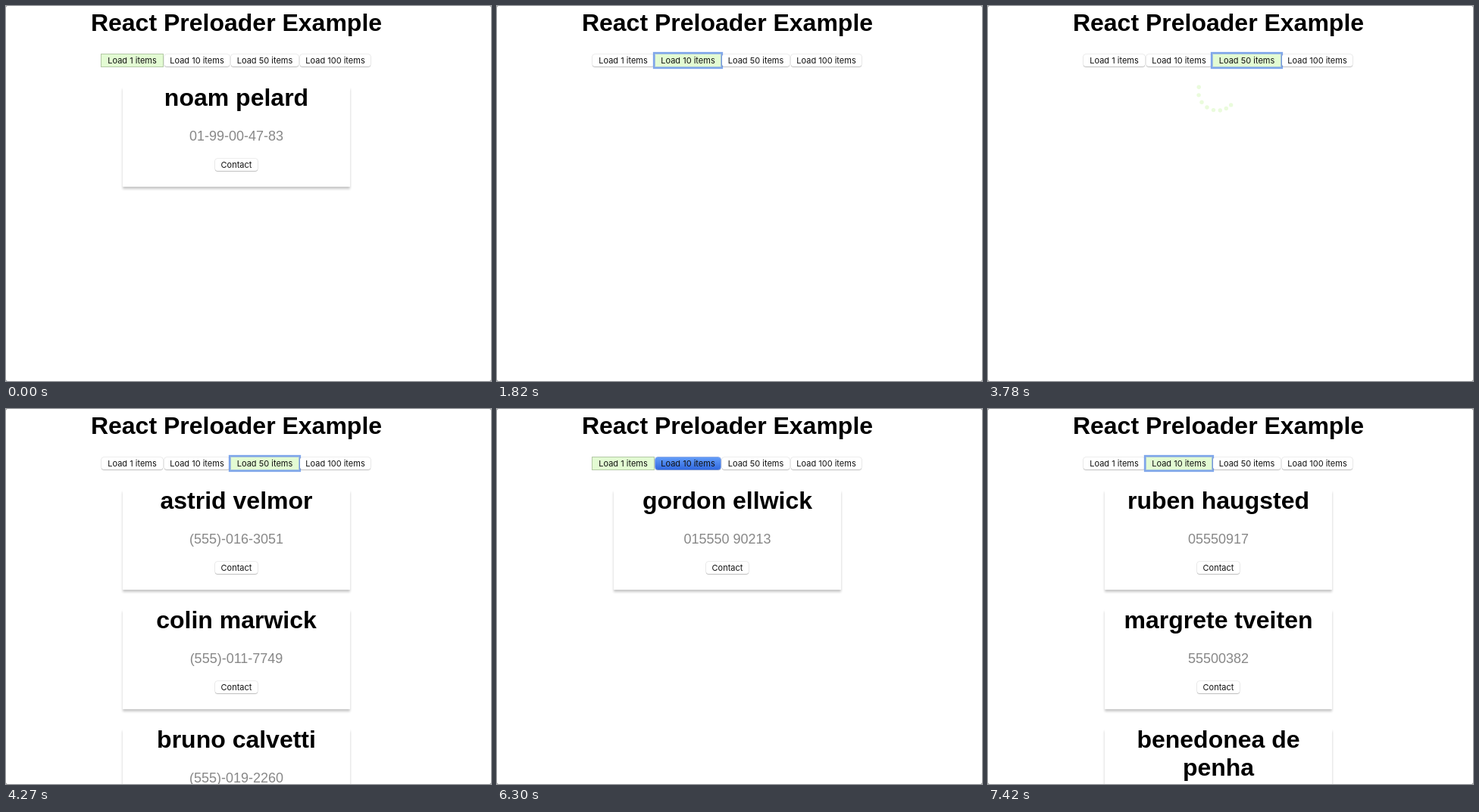
Write an HTML page that moves like this. It is 640 by 496 pixels and loops after 8000 ms.

```html
<!DOCTYPE html>
<html lang="en">
<head>
<meta charset="utf-8">
<title>React Preloader Example</title>
<style>
  html, body { margin: 0; width: 100%; height: 100%; overflow: hidden; background: #777; }
  #stage {
    position: relative; width: 640px; height: 496px; overflow: hidden;
    background: #fff; border-radius: 2px;
    font-family: "Liberation Sans", Arial, sans-serif; text-align: center;
  }
  #stage > *, .card > * { position: absolute; margin: 0; box-sizing: border-box; }
  h1, h2 { font-size: 32px; line-height: 37px; font-weight: bold; color: #000; }
  h1 { left: 0; top: 4px; width: 608px; }
  .btn {
    height: 16px; border-radius: 3px; background: #fff; color: #111;
    font: 11px/16px Inter, sans-serif; white-space: nowrap;
    box-shadow: 0 0 0 .5px rgba(0,0,0,.14), 0 1px 1px rgba(0,0,0,.2);
  }
  .btn.active {
    border-radius: 0; background: #e3fbd3;
    box-shadow: 0 0 0 1px #b4c9a6;
  }
  .btn.ring { box-shadow: 0 0 0 1px #a5c3dc, 0 0 1px 3px #7fa6ea; }
  .btn.pressed {
    background: linear-gradient(#639df8, #3169e0);
    box-shadow: 0 0 0 .5px #2b5fd0, 0 1px 1px rgba(0,0,0,.25);
  }
  .card {
    left: 154px; width: 300px; height: 132px; background: #fff;
    box-shadow: 0 3px 3px rgba(0,0,0,.22);
  }
  .card h2 { left: 0; top: -4px; width: 300px; white-space: pre; }
  .card p { left: 0; top: 55px; width: 300px; font-size: 18px; line-height: 20px; color: #888; }
  .card .btn { left: 122px; top: 95px; width: 56px; }
  .card.tall { height: 169px; }
  .card.tall p { top: 92px; }
  .card.tall .btn { top: 132px; }
  #spinner { left: 0; top: 0; }
</style>
</head>
<body>
<div id="stage"><h1>React Preloader Example</h1></div>
<script>
const LOOP = 8000, STEP = 70;
const stage = document.getElementById("stage");

const buttons = [
  ["Load 1 items", 126, 81], ["Load 10 items", 209, 86],
  ["Load 50 items", 297, 89], ["Load 100 items", 388, 93]
];

const lists = {
  single: [["noam pelard", "01-99-00-47-83"]],
  ten: [["meron kuang", "(555)-014-2387"], ["kristel harlow", "(555)-018-6402"],
        ["goran bonvel", "(555)-012-9716"]],
  fifty: [["astrid velmor", "(555)-016-3051"], ["colin marwick", "(555)-011-7749"],
          ["bruno calvetti", "(555)-019-2260"]],
  singleAgain: [["gordon ellwick", "015550 90213"]],
  tenAgain: [["ruben haugsted", "05550917"], ["margrete tveiten", "55500382"],
             ["benedonea de\npenha", "(55) 5550-0174"]]
};

// time, active button, focus ring, pressed button, content
const states = [
  [0, 0, false, -1, "single"],
  [1400, 0, true, -1, "single"],
  [1820, 1, true, -1, ""],
  [1960, 1, true, -1, "spinner"],
  [2450, 1, true, -1, "ten"],
  [3290, 1, false, 2, "ten"],
  [3360, 2, true, -1, ""],
  [3780, 2, true, -1, "spinner"],
  [3850, 2, true, -1, "fifty"],
  [4970, 0, true, -1, ""],
  [5250, 0, true, -1, "spinner"],
  [5390, 0, true, -1, "singleAgain"],
  [6300, 0, false, 1, "singleAgain"],
  [6370, 1, true, -1, ""],
  [6510, 1, true, -1, "tenAgain"]
];

function add(parent, tag, cls, text = "") {
  const el = document.createElement(tag);
  el.className = cls;
  el.textContent = text;
  return parent.appendChild(el);
}

const buttonEls = buttons.map(([label, x, width]) => {
  const el = add(stage, "div", "btn", label);
  el.style.cssText = `left:${x}px;top:64px;width:${width}px`;
  return el;
});

const groups = {};
for (const [key, people] of Object.entries(lists)) {
  groups[key] = people.map(([name, phone], i) => {
    const card = add(stage, "div", name.includes("\n") ? "card tall" : "card");
    card.style.top = 107 + 158 * i + "px";
    add(card, "h2", "", name);
    add(card, "p", "", phone);
    add(card, "div", "btn", "Contact");
    return card;
  });
}

const SVG = "http://www.w3.org/2000/svg";
function svg(parent, tag, attrs) {
  const el = document.createElementNS(SVG, tag);
  for (const key in attrs) el.setAttribute(key, attrs[key]);
  return parent.appendChild(el);
}

// Eight dots on an arc, closer together towards one end
const spinner = svg(stage, "svg", { id: "spinner", width: 640, height: 496 });
const arc = svg(spinner, "g", { fill: "#eafbdc" });
for (let i = 0; i < 8; i++) {
  const a = (193 - 24.8 * i + 0.53 * i * i) * Math.PI / 180;
  svg(arc, "circle", { cx: 302.9 + 25.3 * Math.cos(a), cy: 112.9 + 25.3 * Math.sin(a), r: 2.7 });
}
groups.spinner = [spinner];

function draw(t) {
  const [start, active, ring, pressed, content] = states.findLast(s => s[0] <= t);
  buttonEls.forEach((el, i) => {
    el.classList.toggle("active", i === active);
    el.classList.toggle("ring", i === active && ring);
    el.classList.toggle("pressed", i === pressed);
  });
  for (const key in groups) {
    for (const el of groups[key]) el.style.display = key === content ? "" : "none";
  }
  const turn = Math.floor((t - start) / STEP) * 25;
  arc.setAttribute("transform", `rotate(${turn} 302.9 112.9)`);
}

const began = performance.now();
function tick() {
  draw((performance.now() - began) % LOOP);
  requestAnimationFrame(tick);
}
tick();
</script>
</body>
</html>
```
